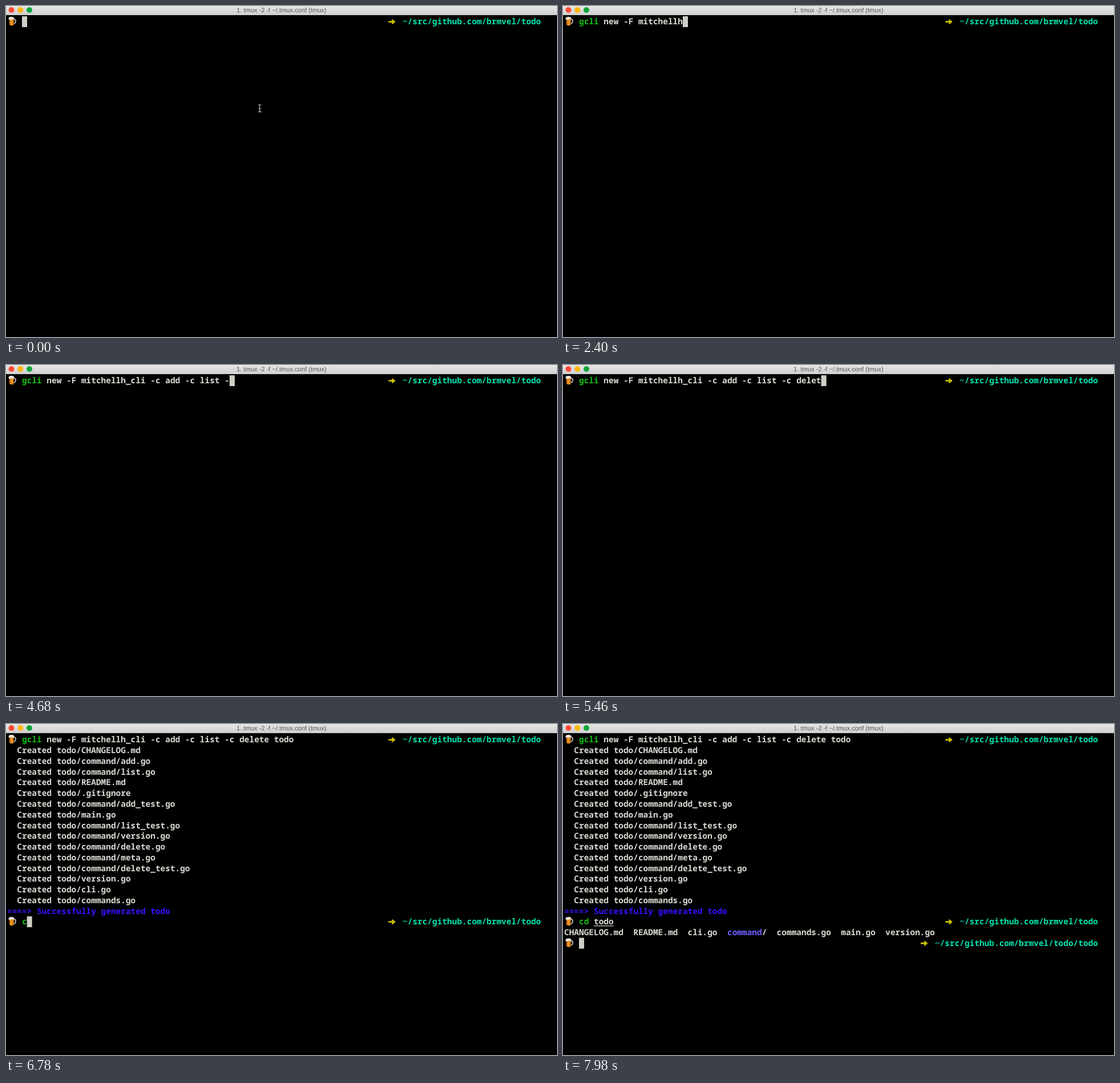
Animation of 966 by 580 pixels, one loop 8 s. Source, as an HTML page:

```html
<!DOCTYPE html>
<html lang="en">
<head>
<meta charset="utf-8">
<title>Terminal</title>
<style>
  html, body { margin: 0; width: 100%; height: 100%; overflow: hidden; background: #000; }
  svg { display: block; width: 966px; height: 580px; }
  text { white-space: pre; text-rendering: geometricPrecision; }
  #screen { font: 600 14.44px "Noto Sans Mono", "DejaVu Sans Mono", monospace; fill: #d9d9d2; }
  #title { font: 11.1px "Liberation Sans", sans-serif; fill: #55555c; }
  .green { fill: #10c014; }
  .red { fill: #d8281c; }
  .path { fill: #00e2ac; }
  .notice { fill: #3512ff; }
  .folder { fill: #6c5cff; }
</style>
</head>
<body>
<svg viewBox="0 0 966 580">
  <defs>
    <linearGradient id="bar" x2="0" y2="1">
      <stop offset="0" stop-color="#e6e6e3"/>
      <stop offset="1" stop-color="#cfcfd0"/>
    </linearGradient>
    <linearGradient id="ale">
      <stop offset="0" stop-color="#b85a10"/>
      <stop offset=".5" stop-color="#f0a028"/>
      <stop offset="1" stop-color="#c46a14"/>
    </linearGradient>
    <g id="mug">
      <path d="M13 5.5h2.2q2 0 1.8 2.2l-.5 3q-.4 2-3 2.3" fill="none" stroke="#d8d4cc" stroke-width="1.6"/>
      <path d="M5.5 4h8.5l-.6 11.5q-4 1.6-7.4-.6z" fill="url(#ale)"/>
      <path d="M4.6 5.2q-.6-3 2-3.6 3-1.4 5.4-.2 3 .4 2.4 3.2-1 1.4-2.4.4-1.5 1.2-3 .2-1 2.2-2 .4-1.4 1-2.4-.4z" fill="#efeae0"/>
    </g>
    <path id="arrow" d="M1.5 8.2h5.7v-2q0-1.6 1.3-.8l4.4 3.5q.8.7 0 1.4l-4.4 3.5q-1.3.8-1.3-.8v-2H1.5q-1.2-1.4 0-2.8z" fill="#cbbf08"/>
  </defs>
  <rect width="966" height="580"/>
  <rect width="966" height="16" fill="url(#bar)"/>
  <circle cx="9.5" cy="7" r="5" fill="#ff4a36"/>
  <circle cx="25.3" cy="7" r="5" fill="#ffb60a"/>
  <circle cx="41" cy="7" r="5" fill="#0fa53a"/>
  <text id="title" x="483" y="11" text-anchor="middle">1. tmux -2 -f ~/.tmux.conf (tmux)</text>
  <g id="screen"></g>
  <path id="pointer" d="M441.8 172.5q3 0 3 3v7.5q0 3-3 3M447.8 172.5q-3 0-3 3v7.5q0 3 3 3M442.8 180h4" fill="none" stroke="#b8b8b8" stroke-width="1.2"/>
</svg>
<script>
const LOOP = 8000, OUTPUT_AT = 6420, LISTING_AT = 7530;
const LEFT = 2, CELL = 8.667, TOP = 18, ROW = 18.77;
const HOME = '~/src/github.com/brmvel/todo';
const GENERATE = 'gcli new -F mitchellh_cli -c add -c list -c delete todo';
const ENTER_DIR = 'cd todo';

// Typing pace: [time, characters typed]
const GENERATE_PACE = [[200, 1], [1050, 10.5], [2400, 21.5], [4680, 42.5], [6150, 55]];
const ENTER_PACE = [[6740, 1], [7380, 7]];

const CREATED = `CHANGELOG.md command/add.go command/list.go README.md .gitignore
  command/add_test.go main.go command/list_test.go command/version.go command/delete.go
  command/meta.go command/delete_test.go version.go cli.go commands.go`.split(/\s+/);

const LISTING = 'CHANGELOG.md  README.md  cli.go  command/  commands.go  main.go  version.go';

const screen = document.getElementById('screen');
const pointer = document.getElementById('pointer');
const colX = col => LEFT + col * CELL;
const rowY = row => TOP + row * ROW;

function typed(pace, t) {
  if (t < pace[0][0]) return 0;
  for (let i = 1; i < pace.length; i++) {
    const [t0, n0] = pace[i - 1], [t1, n1] = pace[i];
    if (t < t1) return Math.floor(n0 + (n1 - n0) * (t - t0) / (t1 - t0));
  }
  return Math.floor(pace[pace.length - 1][1]);
}

function text(col, row, string, style = '') {
  const safe = string.replace(/>/g, '&gt;');
  return `<text x="${colX(col)}" y="${rowY(row) + 14.4}" class="${style}">${safe}</text>`;
}

const icon = (name, x, row) => `<use href="#${name}" x="${x}" y="${rowY(row)}"/>`;

function prompt(row, path, command, active) {
  const pathCol = 108 - path.length;
  const [program] = command.split(' ');
  const style = ['gc', 'gcl'].includes(program) ? 'red' : 'green';
  let out = icon('mug', 0, row) + icon('arrow', colX(pathCol - 3), row) +
    text(pathCol, row, path, 'path') +
    text(3, row, program, style) +
    text(3 + program.length, row, command.slice(program.length));
  if (program === 'cd' && command.length > 3) {
    out += `<rect x="${colX(6)}" y="${rowY(row) + 16}" width="${(command.length - 3) * CELL}" height="1.2"/>`;
  }
  if (active) {
    out += `<rect x="${colX(3 + command.length)}" y="${rowY(row)}" width="9" height="19" fill="#cfcfc8"/>`;
  }
  return out;
}

function generatedOutput() {
  return CREATED.map((file, i) => text(2, i + 1, 'Created todo/' + file)).join('') +
    text(0, 16, '====> Successfully generated todo', 'notice');
}

function listing() {
  const start = LISTING.indexOf('command/'), end = start + 'command'.length;
  return text(0, 18, LISTING.slice(0, start)) +
    text(start, 18, 'command', 'folder') +
    text(end, 18, LISTING.slice(end));
}

let shown = '';
function draw(t) {
  const first = typed(GENERATE_PACE, t), second = typed(ENTER_PACE, t);
  const generated = t >= OUTPUT_AT, listed = t >= LISTING_AT;
  const state = [first, second, generated, listed].join();
  if (state === shown) return;
  shown = state;

  let out = prompt(0, HOME, GENERATE.slice(0, first), !generated);
  if (generated) out += generatedOutput() + prompt(17, HOME, ENTER_DIR.slice(0, second), !listed);
  if (listed) out += listing() + prompt(19, HOME + '/todo', '', true);
  screen.innerHTML = out;
  pointer.style.display = first ? 'none' : '';
}

const start = performance.now();
function frame() {
  draw((performance.now() - start) % LOOP);
  requestAnimationFrame(frame);
}
frame();
</script>
</body>
</html>
```
